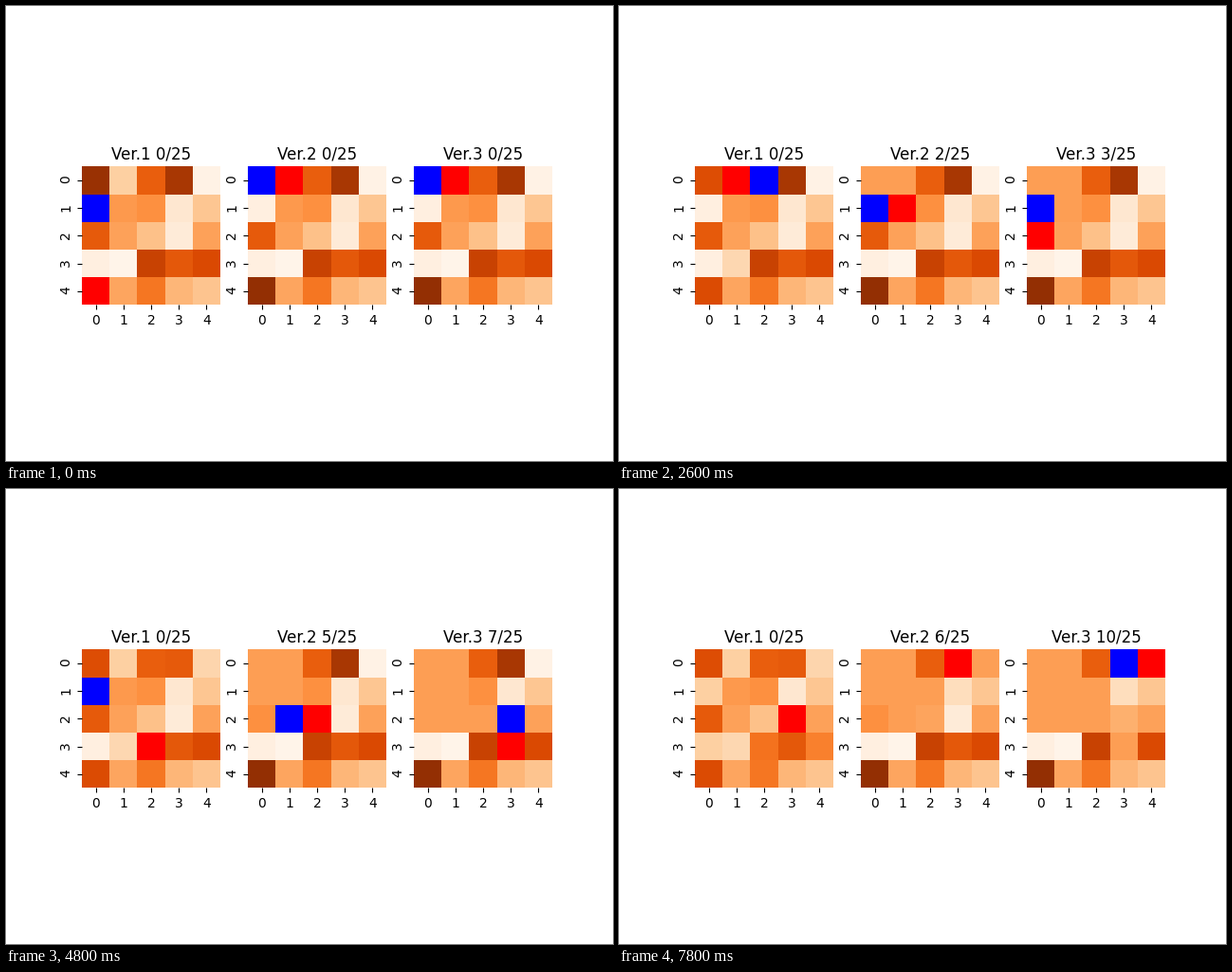
These frames come from a looping animation (640x480 px, 8 s). A matplotlib script:

```python
import numpy as np
import matplotlib.pyplot as plt
from matplotlib.animation import FuncAnimation

FRAMES = 40
STEP = 200  # ms per frame
N = 5
RED, BLUE = (1, 0, 0), (0, 0, 1)

START = np.array([
    [.917, .250, .667, .870, .030],
    [.050, .455, .490, .120, .287],
    [.680, .425, .305, .085, .425],
    [.050, .010, .790, .690, .745],
    [.935, .410, .580, .345, .295],
])

# cursor: frame, then red and blue cells as "row column" digits
# flows: frame, cell that loses, cell that gains, amount ("" is the carrier's hand)
# done: frames at which one more cell is counted as level
PANELS = [
    dict(
        name="Ver.1",
        cursor=[(0, "40", "10"), (2, "40", "31"), (4, "40", ""),
                (5, "31", "40"), (7, "31", ""), (8, "20", "00"),
                (9, "10", "00"), (10, "00", "01"), (12, "00", ""),
                (13, "01", "02"), (15, "02", "03"), (17, "03", "04"),
                (18, "04", ""), (19, "03", "04"), (21, "03", ""),
                (22, "12", "10"), (24, "32", "10"), (26, "10", "32"),
                (28, "32", ""), (30, "31", "30"), (32, "30", "32"),
                (33, "33", "32"), (34, "34", "32"), (36, "34", ""),
                (37, "33", "24"), (39, "23", "")],
        flows=[(3, "40", "", .2), (7, "", "31", .2),
               (12, "00", "", .19), (18, "", "04", .19),
               (21, "03", "", .19), (26, "", "10", .2),
               (29, "32", "", .2), (32, "", "30", .2),
               (36, "34", "", .2)],
        done=[],
    ),
    dict(
        name="Ver.2",
        cursor=[(0, "01", "00"), (2, "00", ""), (4, "10", "00"),
                (7, "00", ""), (11, "10", "00"), (13, "11", "10"),
                (15, "10", ""), (17, "20", "10"), (19, "20", ""),
                (20, "21", "20"), (22, "21", ""), (23, "22", "21"),
                (25, "22", ""), (26, "12", "22"), (27, "12", ""),
                (28, "13", "12"), (30, "13", ""), (31, "03", "13"),
                (32, "03", ""), (33, "03", "04"), (36, "03", "")],
        flows=[(2, "00", "01", .186), (7, "00", "10", .2),
               (12, "00", "10", .095), (15, "11", "10", .019),
               (18, "20", "10", .072), (21, "20", "21", .118),
               (23, "21", "22", .107), (29, "12", "13", .055),
               (33, "03", "04", .2), (36, "03", "04", .2)],
        done=[2, 12, 15, 18, 23, 27],
    ),
    dict(
        name="Ver.3",
        cursor=[(0, "01", "00"), (2, "00", ""), (4, "10", "00"),
                (6, "10", ""), (8, "11", "10"), (10, "11", ""),
                (12, "10", "11"), (13, "20", "10"), (15, "20", ""),
                (16, "21", "20"), (17, "21", "10"), (18, "22", "21"),
                (20, "21", "22"), (22, "23", "22"), (24, "33", "23"),
                (26, "23", ""), (27, "22", "23"), (28, "12", "23"),
                (29, "12", ""), (30, "13", "12"), (32, "13", ""),
                (33, "03", "13"), (34, "03", ""), (36, "04", "03")],
        flows=[(2, "00", "01", .186), (6, "00", "10", .295),
               (11, "11", "10", .019), (14, "20", "10", .072),
               (16, "20", "21", .172), (19, "21", "22", .131),
               (21, "21", "23", .03), (26, "33", "23", .254),
               (29, "12", "13", .055), (37, "03", "04", .434)],
        done=[2, 6, 11, 14, 16, 19, 21, 26, 29, 37],
    ),
]


def cell(key):
    return int(key[0]), int(key[1])


def levels(panel, frame):
    grid = START.copy()
    for when, src, dst, amount in panel["flows"]:
        if when > frame:
            break
        if src:
            grid[cell(src)] -= amount
        if dst:
            grid[cell(dst)] += amount
    return grid


def colours(panel, frame):
    rgb = plt.cm.Oranges(levels(panel, frame))[..., :3]
    _, red, blue = [c for c in panel["cursor"] if c[0] <= frame][-1]
    if blue:
        rgb[cell(blue)] = BLUE
    rgb[cell(red)] = RED
    return rgb


def caption(panel, frame):
    count = sum(when <= frame for when in panel["done"])
    return f"{panel['name']} {count}/{N * N}"


def heatmap(ax, panel):
    mesh = ax.pcolormesh(colours(panel, 0))
    ax.set(xlim=(0, N), ylim=(N, 0), aspect="equal")
    ticks = np.arange(N) + .5
    ax.set_xticks(ticks, range(N))
    ax.set_yticks(ticks, range(N), rotation="vertical")
    ax.spines[:].set_visible(False)
    return mesh, ax.set_title(caption(panel, 0))


plt.rcParams["font.family"] = "DejaVu Sans"
fig, axes = plt.subplots(1, 3, figsize=(6.4, 4.8), dpi=100)
views = [heatmap(ax, panel) for ax, panel in zip(axes, PANELS)]


def update(frame):
    for panel, (mesh, title) in zip(PANELS, views):
        mesh.set_array(colours(panel, frame))
        title.set_text(caption(panel, frame))
    return [artist for view in views for artist in view]


anim = FuncAnimation(fig, update, frames=FRAMES, interval=STEP,
                     repeat=True, repeat_delay=0, blit=False)
plt.show()
```
